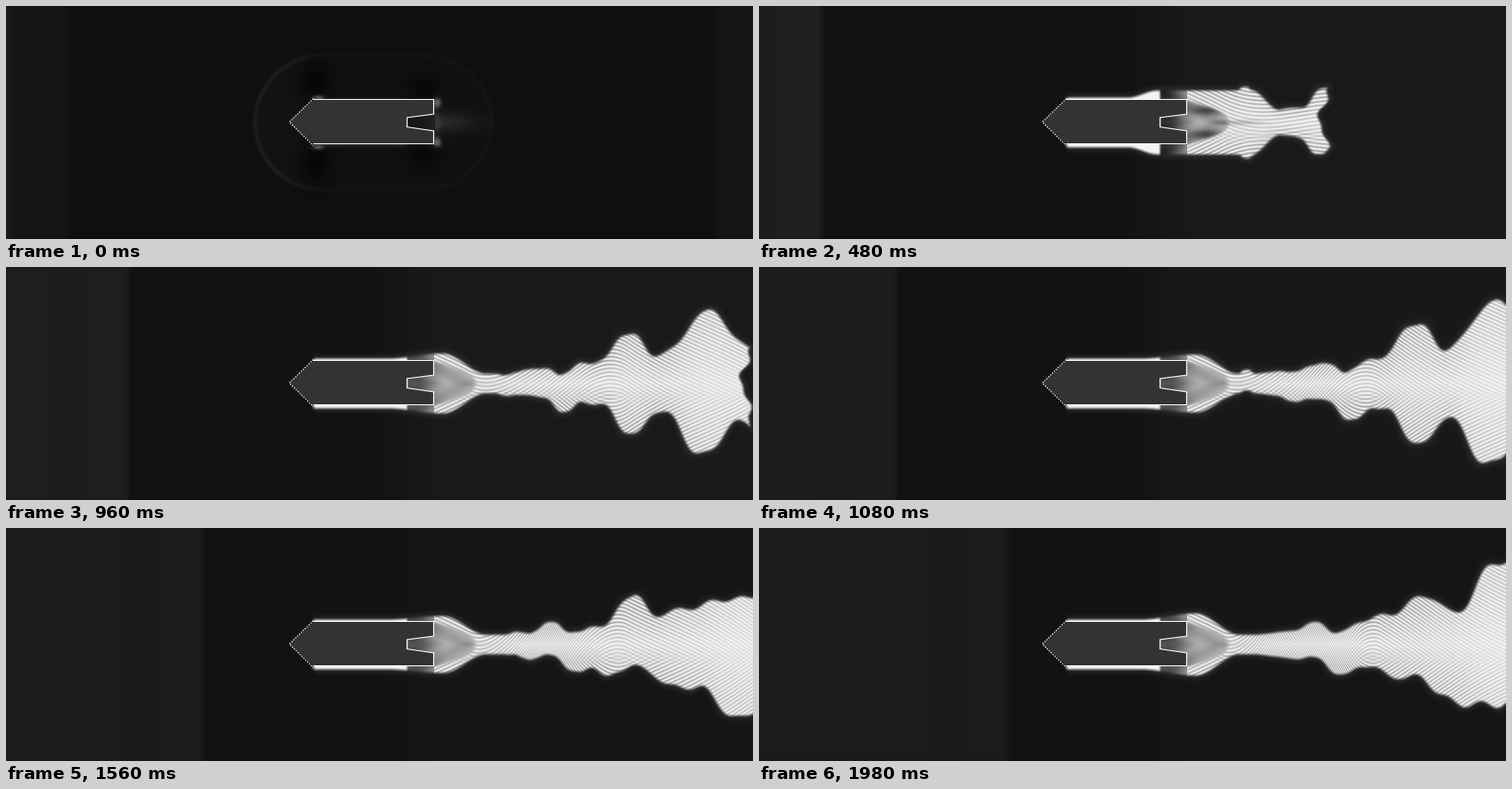
An HTML page with a canvas that plays this animation: 841x263 px, repeating every 2.04 s.

```html
<!DOCTYPE html>
<html lang="en">
<head>
<meta charset="utf-8">
<title>Flow around a body</title>
<style>
  html, body { margin: 0; width: 100%; height: 100%; overflow: hidden; background: #111; }
  canvas { display: block; width: 841px; height: 263px; }
</style>
</head>
<body>
<canvas id="stage" width="841" height="263"></canvas>
<script>
const W = 841, H = 263, MID = 131, STEP = 60, LOOP = 2040;
const SPEED = 0.32;   // downstream drift, px per ms
const ORIGIN = 520;   // where the puffs start to grow

const ctx = document.getElementById('stage').getContext('2d');
const image = ctx.createImageData(W, H);
const px = image.data;

const lerp = (a, b, k) => a + (b - a) * k;
const clamp = v => Math.max(0, Math.min(1, v));
const smooth = (a, b, v) => { const k = clamp((v - a) / (b - a)); return k * k * (3 - 2 * k); };
const gauss = q => Math.exp(-q * q);
const bump = (x, y, cx, cy, rx, ry) => gauss((x - cx) / rx) * gauss((y - cy) / ry);

// Shed puffs: [place in the drifting flow, growth per px travelled]
const upperPuffs = [[480, 0.16], [393, 0.16], [335, 0.03], [280, 0.03], [203, 0.16], [114, 0.08], [78, 0.04], [-9, 0.05]];
const lowerPuffs = [[476, 0.15], [395, 0.15], [321, 0.13], [255, 0.06], [184, 0.09], [141, 0.08], [86, 0.04], [21, 0.08]];

function puffHeight(puffs, x, t) {
  let sum = 0;
  for (const [place, growth] of puffs) {
    const at = place + SPEED * t, run = at - ORIGIN;
    if (run <= 0) continue;
    const q = Math.abs(x - at) / (4 + 0.085 * run);
    if (q < 3) sum += growth * run * Math.exp(-(q ** 3));
  }
  return sum;
}

// Half height of the layer along the body, closing to a throat and widening again
function halfHeight(x, t) {
  const settle = smooth(480, 680, t);
  const swell = t < 480
    ? 8 * smooth(60, 400, t)
    : lerp(8, 5 + 2 * Math.cos((t - 720) / 200), settle);
  const hull = lerp(26.5, 28, smooth(0, 240, t))
    + swell * smooth(lerp(415, 430, settle), lerp(448, 490, settle), x);
  const fall = lerp(Math.max(488, 401 + SPEED * Math.min(t, 480)), 492, settle);
  const spread = 11 + 0.12 * Math.max(0, x - 560);
  return lerp(hull, spread, smooth(fall, fall + lerp(32, 48, settle), x));
}

function outlines(t) {
  const top = [], bottom = [];
  for (let x = 0; x < W; x++) {
    const half = halfHeight(x, t);
    const up = puffHeight(upperPuffs, x, t), down = puffHeight(lowerPuffs, x, t);
    const s = x - SPEED * t, run = Math.max(0, x - 560);
    // later puffs alternate and bend the whole stream towards their side
    const pull = 0.7 * (1 - smooth(340, 380, s)) * (1 - smooth(640, 760, x));
    const ripple = 0.012 * run * Math.sin(s / 6) + 0.012 * run * Math.sin(s / 10.3);
    top[x] = MID - half - up + pull * down + ripple;
    bottom[x] = MID + half + down - pull * up + 0.8 * ripple;
  }
  return { top, bottom };
}

function frontAt(y, t) {
  const tip = 487 + SPEED * t + 0.09 * Math.max(0, t - 480);
  const m = y - MID;
  return tip - 12 * gauss((m + 4) / 17) * smooth(200, 480, t)
    - 0.4 * Math.max(0, Math.abs(m) - 42) + 2 * Math.sin(y / 4);
}

function backdrop(x, t) {
  const edge = 70 + (t - 480) * 0.14;
  const early = clamp(1 - t / 260);
  const level = t < 480 ? lerp(8, 14, t / 480) : lerp(13, 9, (t - 480) / 1500);
  let v = lerp(15, 18, clamp(t / 400));
  v += level * (1 - smooth(edge - 5, edge + 5, x));
  v -= 2 * smooth(edge - 95, edge - 85, x) * (1 - smooth(edge - 55, edge - 45, x));
  v += 6 * early * (1 - smooth(64, 74, x)) + 5 * early * smooth(797, 803, x);
  v += (1 - early) * lerp(7, 3, smooth(960, 1500, t)) * smooth(400, 500, x);
  return v;
}

// Pressure ring and corner vortices of the impulsive start
function startWave(x, y, t, fade) {
  const m = Math.abs(y - MID);
  const d = Math.hypot(x - Math.max(356, Math.min(470, x)), m) - 78 - 0.25 * t;
  const side = lerp(1, 0.3, smooth(300, 380, x));
  let v = 3 * side * (1 - smooth(-3, 2, d)) + 11 * side * gauss((d + 2) / 2.5);
  v -= 11 * bump(x, m, 348, 46, 17, 24) + 8 * bump(x, m, 470, 38, 18, 18);
  v += 75 * bump(x, m, 351, 28, 6, 2.5) + 80 * bump(x, m, 485, 22, 4, 5);
  if (x > 482) v += 26 * bump(x, m, 482, 0, 45, 11);
  return v * fade;
}

function wakeTone(x, y, t, top, bottom) {
  const m = y - MID, am = Math.abs(m);
  const flow = x - SPEED * t * smooth(520, 700, x);
  const lean = 0.58 * flow - 5 * Math.sin(flow / 38);
  const fall = 0.5 + 0.5 * Math.sin((y - lean) * 1.45);
  const rise = 0.5 + 0.5 * Math.sin((y + lean) * 1.45);
  const hatch = lerp(fall, rise, smooth(2, 28, m));
  const rim = clamp(am / Math.max(8, (bottom - top) / 2));
  const depth = lerp(35, 82, rim) * smooth(440, 500, x) * lerp(1, 0.62, smooth(720, 840, x));
  let v = 244 - depth * hatch;

  // slow grey pocket behind the base
  const half = 25 * Math.sqrt(clamp((530 - x) / 48));
  const inner = x < 482 ? 1 : smooth(-3, 3, half - am) * (1 - smooth(522, 534, x));
  const young = 1 - smooth(480, 800, t);
  let core = lerp(75, 165, smooth(452, 500, x)) + 10 * Math.sin(x / 7 + am / 4);
  core -= young * (95 * bump(x, am, 505, 14, 19, 6) + 35 * (1 - smooth(452, 490, x)));
  v = lerp(v, core, inner * smooth(449, 453, x));
  return v - (15 + 30 * young) * bump(x, m, 535, 0, 32, 3) * smooth(495, 515, x);
}

function drawBody() {
  const sides = 'M346 105.5H481.5V122L451.5 126V136.5L481.5 141V155.5H346';
  ctx.fillStyle = '#333';
  ctx.fill(new Path2D(sides + 'L319 131Z'));
  ctx.strokeStyle = '#fff';
  ctx.lineWidth = 1.2;
  ctx.stroke(new Path2D(sides));
  ctx.setLineDash([1.5, 1.5]);
  ctx.stroke(new Path2D('M346 104.5L319 131L346 157.5'));
  ctx.setLineDash([]);
}

function draw(t) {
  const { top, bottom } = outlines(t);
  const fronts = Array.from({ length: H }, (_, y) => frontAt(y, t));
  const fade = Math.exp(-t / 110);
  const gain = clamp(0.12 + t / 220);
  const stretch = (list, x) => Math.hypot(1, ((list[x + 1] ?? list[x]) - (list[x - 1] ?? list[x])) / 2);

  for (let x = 0; x < W; x++) {
    const base = backdrop(x, t);
    const st = stretch(top, x), sb = stretch(bottom, x);
    const lead = smooth(343, 349, x) * gain;
    for (let y = 0; y < H; y++) {
      let v = base;
      if (fade > 0.02 && x > 200 && x < 640) v += startWave(x, y, t, fade);
      const near = Math.min((y - top[x]) / st, (bottom[x] - y) / sb, fronts[y] - x);
      if (lead > 0 && near > -9) {
        const cover = smooth(-2.5, 2.5, near) * lead;
        v += 16 * lead * smooth(-9, 0, near);
        if (cover > 0) v = lerp(v, wakeTone(x, y, t, top[x], bottom[x]), cover);
      }
      const i = (y * W + x) * 4;
      const border = x < 1 || y > 260;
      px[i] = border ? v * 0.95 + 2 : v;
      px[i + 1] = border ? v * 0.8 : v;
      px[i + 2] = border ? v * 0.9 : v;
      px[i + 3] = 255;
    }
  }
  ctx.putImageData(image, 0, 0);
  drawBody();
}

const began = performance.now();
let shown = -1;
function tick() {
  const step = Math.floor(((performance.now() - began) % LOOP) / STEP);
  if (step !== shown) draw((shown = step) * STEP);
  requestAnimationFrame(tick);
}
tick();
</script>
</body>
</html>
```
